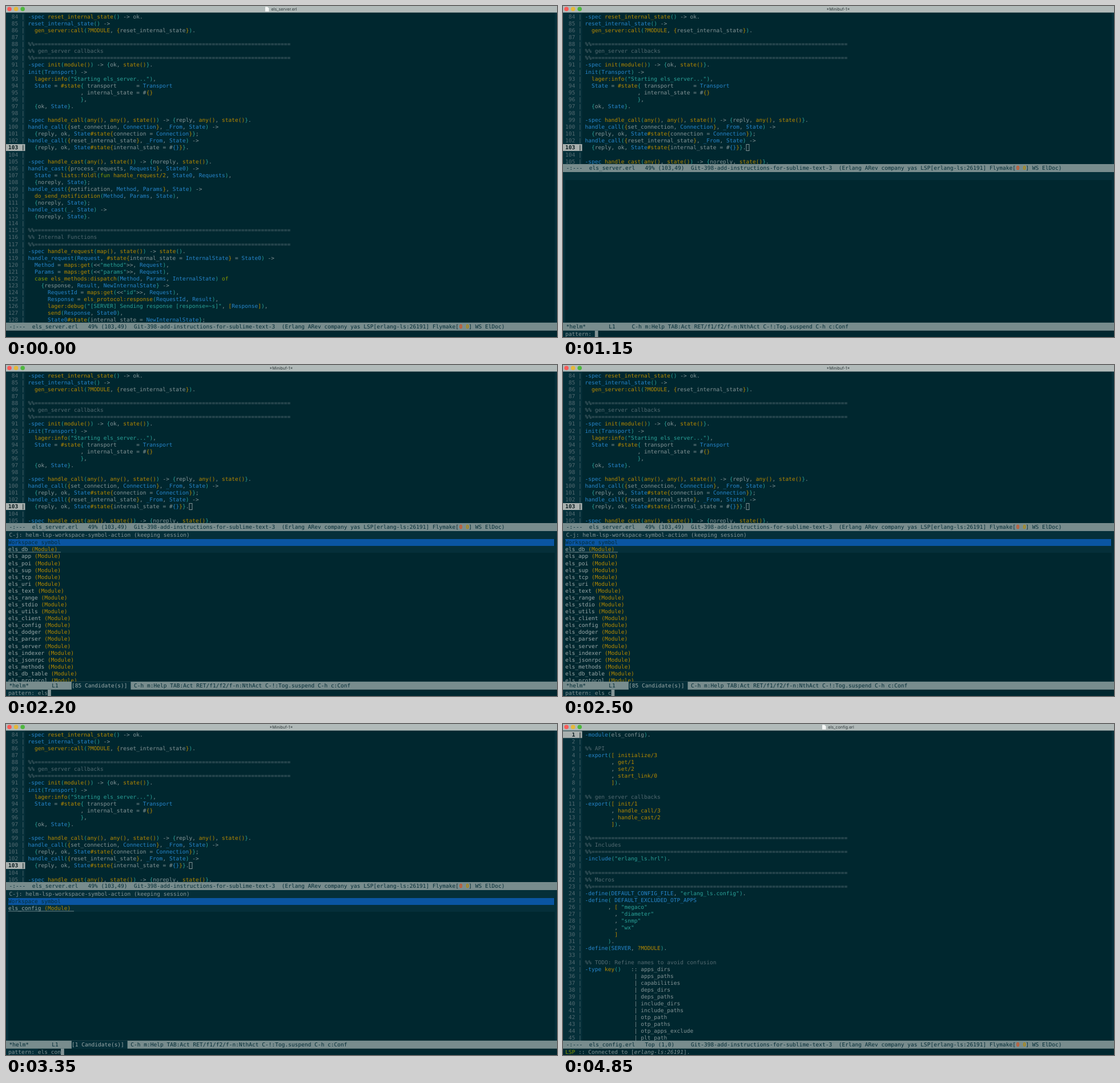
Recreate the animation shown at these times as an HTML page with a canvas. Size 965 by 580 pixels, loop 4900 ms.

```html
<!DOCTYPE html>
<html lang="en">
<head>
<meta charset="utf-8">
<title>Editor session</title>
<style>
html, body { margin: 0; width: 100%; height: 100%; overflow: hidden; background: #00272f; }
canvas { display: block; }
</style>
</head>
<body>
<canvas id="stage" width="965" height="580"></canvas>
<script>
const ctx = document.getElementById('stage').getContext('2d');
const W = 965, H = 580, LOOP = 4900;
const CELL = 5.753, PITCH = 12.08, LEFT = 4, BAR_X = 5.6;
const FONT = '9.556px "DejaVu Sans Mono", monospace';
const C = {
  bg: '#00272f', fringe: '#052f39', text: '#839496', bright: '#9aa8a8', dim: '#536a71',
  blue: '#2686cc', yellow: '#b58900', green: '#859900', cyan: '#2aa198',
  orange: '#dc4a16', bar: '#788c8d', barText: '#042d37', source: '#0a55a2',
  current: '#a9b0ae', black: '#071a1e'
};
const RAINBOW = [C.cyan, C.yellow, C.blue, C.green];
const RULE = '%%' + '='.repeat(78);

const SERVER = `-spec reset_internal_state() -> ok.
reset_internal_state() ->
  gen_server:call(?MODULE, {reset_internal_state}).

${RULE}
%% gen_server callbacks
${RULE}
-spec init(module()) -> {ok, state()}.
init(Transport) ->
  lager:info("Starting els_server..."),
  State = #state{ transport      = Transport
                , internal_state = #{}
                },
  {ok, State}.

-spec handle_call(any(), any(), state()) -> {reply, any(), state()}.
handle_call({set_connection, Connection}, _From, State) ->
  {reply, ok, State#state{connection = Connection}};
handle_call({reset_internal_state}, _From, State) ->
  {reply, ok, State#state{internal_state = #{}}}.

-spec handle_cast(any(), state()) -> {noreply, state()}.
handle_cast({process_requests, Requests}, State0) ->
  State = lists:foldl(fun handle_request/2, State0, Requests),
  {noreply, State};
handle_cast({notification, Method, Params}, State) ->
  do_send_notification(Method, Params, State),
  {noreply, State};
handle_cast(_, State) ->
  {noreply, State}.

${RULE}
%% Internal Functions
${RULE}
-spec handle_request(map(), state()) -> state().
handle_request(Request, #state{internal_state = InternalState} = State0) ->
  Method = maps:get(<<"method">>, Request),
  Params = maps:get(<<"params">>, Request),
  case els_methods:dispatch(Method, Params, InternalState) of
    {response, Result, NewInternalState} ->
      RequestId = maps:get(<<"id">>, Request),
      Response = els_protocol:response(RequestId, Result),
      lager:debug("[SERVER] Sending response [response=~s]", [Response]),
      send(Response, State0),
      State0#state{internal_state = NewInternalState};`;

const KEYS = ['apps_paths', 'capabilities', 'deps_dirs', 'deps_paths', 'include_dirs',
  'include_paths', 'otp_path', 'otp_paths', 'otp_apps_exclude', 'plt_path'];
const CONFIG = `-module(els_config).

%% API
-export([ initialize/3
        , get/1
        , set/2
        , start_link/0
        ]).

%% gen_server callbacks
-export([ init/1
        , handle_call/3
        , handle_cast/2
        ]).

${RULE}
%% Includes
${RULE}
-include("erlang_ls.hrl").

${RULE}
%% Macros
${RULE}
-define(DEFAULT_CONFIG_FILE, "erlang_ls.config").
-define( DEFAULT_EXCLUDED_OTP_APPS
       , [ "megaco"
         , "diameter"
         , "snmp"
         , "wx"
         ]
       ).
-define(SERVER, ?MODULE).

%% TODO: Refine names to avoid confusion
-type key()   :: apps_dirs
` + KEYS.map(key => ' '.repeat(15) + '| ' + key).join('\n');

const COMMANDS = ['helm-lsp-workspace-symbol', 'helm-imenu', 'helm-semantic-or-imenu', 'helm-find',
  'helm-select-action', 'helm-imenu-in-all-buffers', 'help', 'helm-M-x', 'helm-gid', 'helm-top'];
const MODULES = ('db app poi sup tcp uri text range stdio utils client config dodger parser ' +
  'server indexer jsonrpc methods db_table protocol').split(' ');

// Splits Erlang code into coloured runs; bracket depth carries across lines.
function highlight(source) {
  const pattern = /"[^"]*"|\?\w+|#\w+|^-\w+|\w+(?::\w+)?(?=\()|\w+\/\d|\w+|[()[\]{}]|\s+|./g;
  let depth = 0;
  return source.split('\n').map(line => {
    if (line.startsWith('%%')) return [{ text: line, col: 0, color: C.dim }];
    return [...line.matchAll(pattern)].map(({ 0: text, index: col }) => {
      let color = C.text;
      if (/^[([{]$/.test(text)) color = RAINBOW[depth++ % 4];
      else if (/^[)\]}]$/.test(text)) color = RAINBOW[--depth % 4];
      else if (text[0] === '"') color = C.cyan;
      else if (/^(case|of|fun)$/.test(text)) color = C.green;
      else if (/^[A-Z_]/.test(text) || (col === 0 && /^-?\w/.test(text))) color = C.blue;
      else if (/^[?#]\w/.test(text) || /^\w+\/\d/.test(text)) color = C.yellow;
      else if (/^\w/.test(text) && line[col + text.length] === '(') color = C.yellow;
      return { text, col, color };
    }).filter(run => run.text.trim());
  });
}

const serverFile = { name: 'els_server.erl', first: 84, current: 103, lines: highlight(SERVER), place: '49% (103,49)' };
const configFile = { name: 'els_config.erl', first: 1, current: 1, lines: highlight(CONFIG), place: 'Top (1,0)' };

function rect(x, y, w, h, color) {
  ctx.fillStyle = color;
  ctx.fillRect(x, y, w, h);
}

// y is the middle of the text row.
function print(text, x, y, color, style = '') {
  ctx.font = style + ' ' + FONT;
  ctx.fillStyle = color;
  ctx.fillText(text, x, y + 3.4);
}

const colX = col => LEFT + col * CELL;
const rowY = row => 18.5 + row * PITCH;

function titleBar(title, icon) {
  rect(0, 0, W, 11.5, '#b1bab9');
  ['#fc5b57', '#e6b73a', '#4fb83f'].forEach((color, i) => {
    ctx.fillStyle = color;
    ctx.beginPath();
    ctx.arc(6 + i * 11.6, 5.3, 3.8, 0, 7);
    ctx.fill();
  });
  ctx.font = '7.2px Inter, "Liberation Sans", sans-serif';
  ctx.fillStyle = '#303b3c';
  ctx.textAlign = 'center';
  ctx.fillText(title, icon ? 487 : 482, 8.2);
  ctx.textAlign = 'left';
  if (!icon) return;
  ctx.fillStyle = '#f4f6f5';
  ctx.beginPath();
  ctx.moveTo(454, 1.5);
  ctx.lineTo(458, 1.5);
  ctx.lineTo(460.5, 4);
  ctx.lineTo(460.5, 9.5);
  ctx.lineTo(454, 9.5);
  ctx.fill();
}

function fringes(top, bottom) {
  rect(0, top, 4, bottom - top, C.fringe);
  rect(961, top, 4, bottom - top, C.fringe);
}

function modeLine(y, text) {
  rect(0, y - 7, W, 14, C.bar);
  print(text, BAR_X, y, C.barText);
}

function codeWindow(file, barY, { cursor, marked = true, checked = true }) {
  fringes(11.5, barY);
  rect(4, 11.5, 29.5, barY - 11.5, C.fringe);
  file.lines.forEach((runs, row) => {
    const y = rowY(row), number = file.first + row;
    if (y > barY) return;
    const current = marked && number === file.current;
    if (current) rect(0, y - 6, 33.5, 12, C.current);
    print(String(number).padStart(3), LEFT, y, current ? C.black : C.dim, current ? 'bold' : '');
    print('|', colX(4), y, current ? C.black : C.dim, current ? 'bold' : '');
    runs.forEach(run => print(run.text, colX(6 + run.col), y, run.color));
  });
  if (cursor === 'hollow') {
    ctx.strokeStyle = C.text;
    ctx.lineWidth = 1;
    ctx.strokeRect(321, rowY(19) - 5.5, 5, 11);
  } else if (cursor === 'block') {
    rect(colX(6), rowY(0) - 6, CELL, 12, C.text);
    print('-', colX(6), rowY(0), C.bg);
  }
  const flymake = checked ? '[    ]'.replace('    ', '   ') : ':?';
  modeLine(barY, '-:---  ' + file.name + '   ' + file.place.padEnd(14) +
    'Git-398-add-instructions-for-sublime-text-3  ' +
    '(Erlang ARev company yas LSP[erlang-ls:26191] Flymake' + flymake + ' WS ElDoc)');
  if (checked) {
    print('0', BAR_X + 137 * CELL, barY, C.orange, 'bold');
    print('0', BAR_X + 139 * CELL, barY, C.yellow, 'bold');
  }
}

function commandPrompt(input) {
  const top = 453.7;
  rect(0, 447, W, H - 447, C.bg);
  rect(LEFT, top - 6, CELL, 12, C.text);
  print('M', LEFT, top, C.bg);
  print('-x ' + input, colX(1), top, C.text);
  print('->', LEFT, top + PITCH, C.text);
  COMMANDS.forEach((name, i) => {
    const y = top + (i + 1) * PITCH, n = input.length;
    print(name.slice(n), colX(3 + n), y, i ? C.text : C.yellow);
    print(name.slice(0, n), colX(3), y, C.blue);
    rect(colX(3), y + 4.4, n * CELL, 0.9, C.blue);
  });
}

function helmWindow(pattern, modules, total) {
  rect(0, 291, W, H - 291, C.bg);
  rect(0, 291, W, 14, C.fringe);
  fringes(305, 555);
  if (modules) {
    print('C-j: helm-lsp-workspace-symbol-action (keeping session)', BAR_X, 297.8, C.text);
    rect(4, 305, 956, 12, C.source);
    print('Workspace symbol', LEFT, 311, C.barText);
    rect(4, 317, 957, 12, C.fringe);
    modules.forEach((name, i) => {
      const y = 323 + i * PITCH, label = 'els_' + name;
      print(label, LEFT, y, C.bright);
      print('(Module)', colX(label.length + 1), y, C.yellow);
      if (!i) rect(4, y + 4.6, (label.length + 10) * CELL, 0.8, C.text);
    });
  }
  const count = modules ? `[${total} Candidate(s)] ` : '';
  const help = 'C-h m:Help TAB:Act RET/f1/f2/f-n:NthAct C-!:Tog.suspend C-h c:Conf';
  modeLine(561.8, '*helm*       L1    ' + ' '.repeat(count.length + 1) + help);
  if (count) {
    const x = BAR_X + 19 * CELL;
    rect(x, 555, count.length * CELL, 14, C.fringe);
    print(count, x, 561.8, C.bright);
  }
  rect(0, 569, colX(9), 11, C.fringe);
  print('pattern: ', LEFT, 574.5, C.text);
  print(pattern, colX(9), 574.5, C.text);
  rect(colX(9 + pattern.length), 569, CELL, 11, C.text);
}

// Number of letters typed when one key is pressed every `step` ms.
function typed(word, t, start, step) {
  return word.slice(0, Math.max(0, Math.floor((t - start) / step) + 1));
}

function helmScene(t) {
  codeWindow(serverFile, 284, { cursor: 'hollow' });
  const pattern = typed('els', t, 1400, 100) + typed('_con', t, 2350, 100);
  if (t >= 1900 && t < 2550) helmWindow(pattern, MODULES, 85);
  else if (t >= 3050) helmWindow(pattern, ['config'], 1);
  else helmWindow(pattern);
}

function configScene(t) {
  const lit = t < 3950 || (t >= 4350 && t < 4750);
  codeWindow(configFile, 561.8, { cursor: lit ? 'block' : '', checked: t >= 4500 });
  if (t < 3450) return;
  print('LSP', LEFT, 574.5, C.green);
  print(' :: Connected to [', colX(3), 574.5, C.text);
  print('erlang-ls:26191', colX(21), 574.5, C.text, 'italic');
  print('].', colX(36), 574.5, C.text);
}

function draw(t) {
  ctx.textRendering = 'geometricPrecision';
  rect(0, 0, W, H, C.bg);
  if (t < 250) {
    codeWindow(serverFile, 561.8, {});
    titleBar(serverFile.name, true);
  } else if (t < 1100) {
    codeWindow(serverFile, 440.8, { cursor: 'hollow', marked: false });
    commandPrompt(typed('hel', t, 350, 100));
    titleBar('*Minibuf-1*');
  } else if (t < 3400) {
    helmScene(t);
    titleBar('*Minibuf-1*');
  } else {
    configScene(t);
    titleBar(configFile.name, t >= 4000);
  }
}

function tick() {
  const t = performance.now() % LOOP;
  draw(Math.floor(t / 50) * 50);
  requestAnimationFrame(tick);
}
tick();
</script>
</body>
</html>
```
